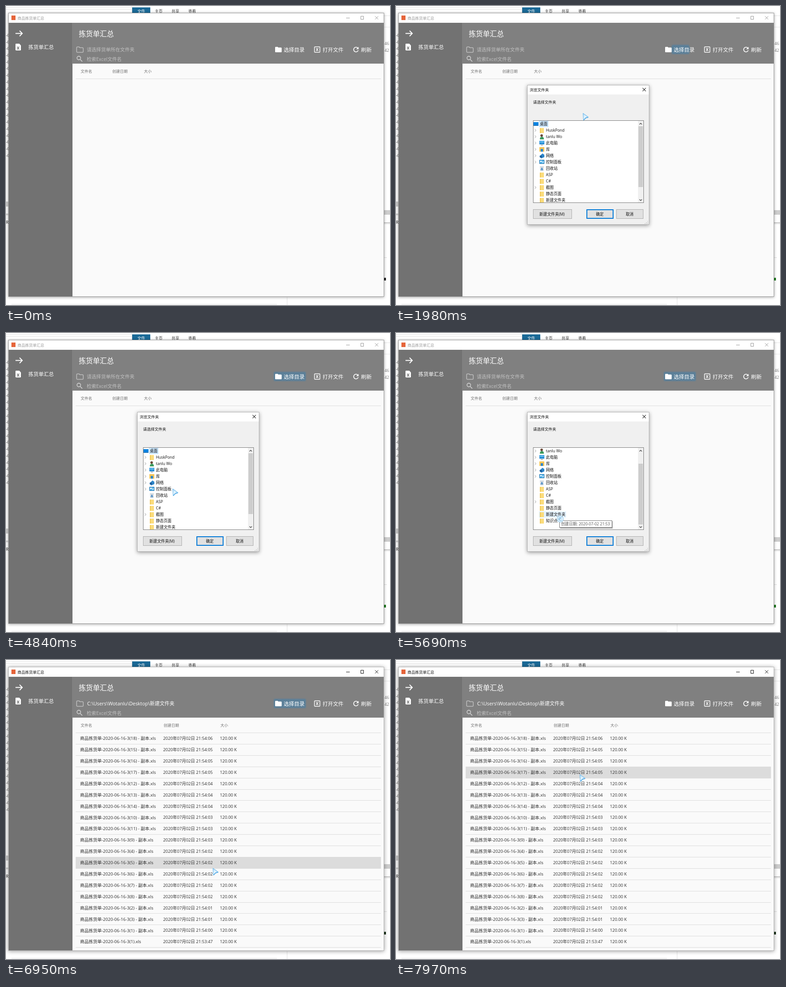
Recreate the animation shown at these times as an HTML page. Size 849 px wide and 659 px high, loop 8 s.

```html
<!DOCTYPE html>
<html lang="zh-CN">
<head>
<meta charset="utf-8">
<title>拣货单汇总</title>
<style>
html, body { margin: 0; width: 100%; height: 100%; overflow: hidden; background: #fff; }
svg { display: block; width: 849px; height: 659px; font-family: "Open Sans", "Noto Sans CJK SC", "Noto Sans CJK", sans-serif; }
text { white-space: pre; }
rect { shape-rendering: crispEdges; }
</style>
</head>
<body>
<svg id="stage" viewBox="0 0 849 659"></svg>
<script>
const LOOP = 8000, ROW = 24.9, TOP = 160;

// drawing helpers
const R = (x, y, w, h, fill, more = '') => `<rect x="${x}" y="${y}" width="${w}" height="${h}" fill="${fill}" ${more}/>`;
const T = (x, mid, size, str, fill, more = '') =>
  `<text x="${x}" y="${(mid + size * .37).toFixed(2)}" font-size="${size}" fill="${fill}" ${more}>${str}</text>`;
const L = (d, color, w = 1, more = '') => `<path d="${d}" fill="none" stroke="${color}" stroke-width="${w}" ${more}/>`;
const F = (d, fill) => `<path d="${d}" fill="${fill}"/>`;
const G = (id, body, more = '') => `<g id="${id}" ${more}>${body}</g>`;
const box = (x, y, w, h, fill, line) => R(x + .5, y + .5, w - 1, h - 1, fill, `stroke="${line}"`);
const range = (n, fn) => Array.from({ length: n }, (_, i) => fn(i)).join('');

// desktop behind the window
const desk = R(0, 0, 849, 659, '#fff') +
  R(0, 3, 278, 1, '#e2e2e2') + R(0, 7, 278, 1, '#e2e2e2') + R(278, 0, 1, 15, '#ddd') +
  R(279, 3, 40, 13, '#1b6a97') + T(290.5, 11.5, 8.6, '文件', '#fff') +
  ['主页', '共享', '查看'].map((s, i) => T(329 + 37 * i, 12, 8.6, s, '#333')).join('') +
  range(19, i => T(0, 64.5 + 14.72 * i, 9, '-0', '#333')) +
  R(0, 431, 6, 11, '#ccc') + R(0, 458, 6, 1, '#aaa') + R(0, 459, 6, 3, '#e6e6e6') +
  T(0, 477, 9, 'R', '#222') +
  R(836, 21, 13, 1, '#e4e4e4') + R(836, 46, 13, 1, '#e8e8e8') +
  T(837, 82.5, 8.6, '46', '#777') + T(837, 97.5, 8.6, '42', '#777') +
  R(836, 450, 13, 10, '#cdcdcd') + R(836, 477, 13, 1, '#aaa') + R(836, 478, 13, 3, '#e8e8e8') +
  R(836, 554, 6, 1, '#ddd') + R(836, 599, 4, 6, '#222', 'id="mark"') +
  R(12, 656, 587, 3, '#f5f5f5') + R(621, 642, 1, 17, '#e2e2e2');

// main window
const folder = (x, y) => `M${x} ${y + 1.5}q0-1.5 1.5-1.5h4l1.5 1.6h6q1.5 0 1.5 1.5v7.4q0 1.5-1.5 1.5h-11.5q-1.5 0-1.5-1.5z`;
const frame = R(5, 15, 831, 626, '#999', 'id="shade"') +
  R(6, 16, 829, 22, '#fff') + R(12, 21, 9, 10, '#e5643a') +
  T(25.5, 26.5, 8.45, '商品拣货单汇总', '#999', 'id="caption"') +
  G('controls', '<path d="M752 26.5h8M784.5 22.5h6v7h-6zM816 22.5l7 7m0-7l-7 7" fill="none"/>') +
  R(6, 37, 141, 603, '#727272') +
  R(147, 37, 688, 603, '#fafafa') + R(146, 37, 689, 90, '#808080') +
  L('M21 60.5h15M30 54.5l6 6-6 6', '#fff', 1.9) +
  F('M22.4 83h7l3.6 4v9.6q0 1.4-1.4 1.4h-9.2q-1.4 0-1.4-1.4v-12.2q0-1.4 1.4-1.4z', '#fff') +
  L('M24.5 89.5l4.6 6.5m0-6.5l-4.6 6.5', '#727272', 1.3) +
  T(49.5, 90.5, 11.25, '拣货单汇总', '#fff') +
  T(161, 61.5, 15.5, '拣货单汇总', '#fff') +
  L(folder(156.2, 90.2), '#c8c8c8', 1.3) +
  L('M165 114.6a4 4 0 1 1-8 0a4 4 0 1 1 8 0M164 117.8l4.6 4.6', '#d0d0d0', 1.6) +
  T(178.5, 96, 10.55, '请选择货单所在文件夹', '#c2c2c2', 'id="hint"') +
  T(179.5, 96, 10.85, 'C:\\Users\\Wotanlu\\Desktop\\新建文件夹', '#fff', 'id="path"') +
  T(178.5, 117, 10.5, '检索Excel文件名', '#c2c2c2') +
  '<g filter="url(#soften)"><g clip-path="url(#btn)"><circle id="ripple" cx="629" cy="96" r="0" fill="#5c8099"/></g></g>' +
  F(folder(595, 90), '#fff') + T(614, 96.5, 11.5, '选择目录', '#fff', 'font-weight="500"') +
  L('M683 90h10q1 0 1 1v10q0 1-1 1h-10q-1 0-1-1v-10q0-1 1-1zM685.7 92.8l4.6 6.4m0-6.4l-4.6 6.4', '#fff', 1.4) +
  T(700, 96.5, 11.5, '打开文件', '#fff', 'font-weight="500"') +
  L('M777.8 92.6a5.2 5.2 0 1 0 1 5', '#fff', 1.6) + F('M779.5 90v5.2h-5.2z', '#fff') +
  T(785, 96.5, 11.7, '刷新', '#fff', 'font-weight="500"') +
  T(165, 143.5, 8.5, '文件名', '#707070') +
  T(235, 143.5, 8.5, '创建日期', '#707070', 'id="colDate"') + T(305, 143.5, 8.5, '大小', '#707070', 'id="colSize"') +
  R(154, 160, 675, 1, '#dcdcdc');

// file table
const nums = [18, 15, 16, 17, 12, 13, 14, 10, 11, 9, 4, 5, 6, 7, 8, 2, 3, 1, 0];
const secs = '06 05 05 05 04 04 04 03 03 03 02 02 02 02 02 01 01 00 47'.split(' ');
const table = R(154, 0, 675, 25, '#dcdcdc', 'id="rowHover"') + nums.map((n, i) => {
  const mid = TOP + ROW * i + 12.7;
  const name = n ? `(${n}) - 副本` : '(1)';
  return T(163.7, mid, 9.57, `商品拣货单-2020-06-16-3${name}.xls`, '#2c2c2c') +
    T(347.5, mid, 9.3, `2020年07月02日 21:${n ? 54 : 53}:${secs[i]}`, '#2c2c2c') +
    T(473, mid, 9.3, '120.00 K', '#2c2c2c') +
    R(154, Math.round(TOP + ROW * (i + 1)), 675, 1, '#dcdcdc');
}).join('');

// folder picker
const yellow = y => R(318, y - 5.5, 9, 11, '#fbdc7c') + R(318, y - 5.5, 2, 11, '#f0c95c');
const screen = (x, y) => R(x, y - 5, 11, 8, '#2b8fd6') + R(x + 1, y - 4, 9, 3, '#63bdf0') + R(x + 3, y + 4, 5, 1, '#777');
const icons = {
  desk: y => R(304, y - 4, 11, 8, '#0a84e0') + R(304, y + 3, 11, 1, '#075a9c'),
  dir: yellow,
  user: y => F(`M318 ${y + 6}q0-6 4.5-6t4.5 6z`, '#3c9a5f') + `<circle cx="322" cy="${y - 2.5}" r="2.8" fill="#6b4a3a"/>`,
  pc: y => screen(317, y),
  lib: y => R(317, y - 5, 11, 10, '#f6c65a') + R(320, y - 1, 5, 6, '#2f86c9'),
  net: y => F(`M317 ${y + 1}l7-6 4 3v5l-7 3z`, '#2f86c9') + R(318, y, 5, 4, '#1d5f9c'),
  panel: y => box(317, y - 5, 11, 9, '#4fb2ea', '#2b77ad') + R(319, y - 3, 3, 3, '#fff') + R(324, y - 2, 2, 4, '#d7f0ff'),
  bin: y => F(`M318 ${y - 5}h9l-1 11h-7z`, '#d5dce2') + L(`M320.5 ${y + 3}l2-4 2 4z`, '#2676bd', 1.2)
};
const tree = [
  ['桌面', 'desk'], ['HuskPond', 'dir', 1], ['tanlu Wo', 'user', 1], ['此电脑', 'pc', 1], ['库', 'lib', 1],
  ['网络', 'net', 1], ['控制面板', 'panel', 1], ['回收站', 'bin'], ['ASP', 'dir'], ['C#', 'dir'],
  ['截图', 'dir', 1], ['静态页面', 'dir'], ['新建文件夹', 'dir'], ['知识点', 'dir']
];
const labelEnd = s => 333 + [...s].reduce((w, c) => w + (c > '\u00ff' ? 8.6 : 4.9), 0);
const button = (x, w, s, tx) => box(x, 448, w, 21, '#e1e1e1', '#adadad') + T(tx, 458.5, 8.6, s, '#111');
const treeRows = R(316, 253, 21, 14, '#cce8ff') + R(316, 0, 40, 14, '#e5f3ff', 'id="treeHover"') +
  tree.map(([s, icon, more], i) => {
    const y = 260 + 14 * i;
    return icons[icon](y) + T(i ? 331.5 : 318, y, 8.6, s, '#111') +
      (more ? L(`M306.5 ${y - 3}l3.2 3-3.2 3`, '#999', 1) : '');
  }).join('');
const picker = R(290, 174, 270, 308, '#aaa', 'filter="url(#dlgShade)"') +
  R(290.5, 174.5, 269, 307, '#f0f0f0', 'stroke="#b5b5b5"') + R(291, 175, 268, 20, '#fff') +
  T(295.5, 184.5, 8.5, '浏览文件夹', '#111') + L('M545.2 180.7l7.2 7.2m0-7.2l-7.2 7.2', '#222', 1.1) +
  T(303, 212, 8.5, '请选择文件夹', '#111') +
  box(303, 252, 245, 182, '#fff', '#7a7a7a') +
  `<g clip-path="url(#treeClip)">${G('treeRows', treeRows)}</g>` +
  R(535, 253, 12, 180, '#f0f0f0') + R(536, 265, 10, 134, '#cdcdcd', 'id="thumb"') +
  L('M538.3 261l2.7-2.7 2.7 2.7M538.3 426.2l2.7 2.7 2.7-2.7', '#444', 1.3) +
  button(303, 86, '新建文件夹(M)', 317) +
  button(487, 60, '取消', 508) +
  R(422, 449, 58, 19, '#e1e1e1', 'id="ok" stroke="#0078d7" stroke-width="2"') + T(442, 458.5, 8.6, '确定', '#111') +
  [[556, 474], [553, 477], [556, 477], [550, 479], [553, 479], [556, 479]].map(([x, y]) => R(x, y, 1, 1, '#999')).join('') +
  G('tip', R(2, 2, 0, 16, '#000', 'opacity=".35" class="tipBox"') + R(.5, .5, 0, 15, '#fff', 'stroke="#767676" class="tipBox"') + T(4, 8, 8.6, '', '#575757', 'id="tipText"'));

const pointer = G('cursor',
  G('arrow', '<path d="M.5 .5L12.2 9 6.3 10.6 1.6 15.6z" fill="url(#ice)" stroke="#78bdec" stroke-width="1.1" stroke-linejoin="round"/>' +
    L('M12 9.2L6.5 10.8 2 15.4', '#4aa5e3', 1.5)) +
  G('busy', '<circle cx="8" cy="8" r="6.7" fill="#f4fbff" stroke="#a9d3ee" stroke-width="1.8"/>' +
    L('M11 6.2a3.4 3.4 0 1 0 .2 3.2M5.8 9.2q2-3 4.4-1.6', '#6bb2e0', 1.3)));

const stage = document.getElementById('stage');
stage.innerHTML = `<defs>
  <filter id="soften" filterUnits="userSpaceOnUse" x="580" y="75" width="95" height="42"><feGaussianBlur stdDeviation="1"/></filter>
  <filter id="dlgShade" x="-10%" y="-10%" width="120%" height="120%"><feDropShadow dx="0" dy="2" stdDeviation="4.5" flood-opacity=".4"/></filter>
  <clipPath id="btn"><rect x="592" y="85.5" width="71" height="20.5" rx="2"/></clipPath>
  <clipPath id="treeClip"><rect x="304" y="253" width="231" height="180"/></clipPath>
  <linearGradient id="ice" x1="0" y1="0" x2="1" y2="1"><stop offset="0" stop-color="#a9d9f7"/><stop offset=".45" stop-color="#e6f5fe"/><stop offset="1" stop-color="#7cc4f2"/></linearGradient>
  </defs>` + desk + frame + G('table', table) + G('picker', picker) + pointer;

const $ = {};
stage.querySelectorAll('[id]').forEach(e => $[e.id] = e);
const set = (id, attrs) => { for (const k in attrs) $[id].setAttribute(k, attrs[k]); };
const show = (id, on) => { $[id].style.display = on ? '' : 'none'; };

// start, end, step count, way points
const moves = [
  [120, 890, 11, [[688, 523], [650, 400], [592, 250], [636, 126]]],
  [970, 1050, 2, [[625, 108], [629, 95]]],
  [1510, 1980, 7, [[611, 104], [500, 190], [413, 236]]],
  [2060, 2360, 5, [[398, 268], [340, 370]]],
  [2590, 3070, 7, [[344, 368], [357, 362], [357, 362], [338, 388]]],
  [3220, 3600, 6, [[333, 362], [358, 347]]],
  [3760, 4370, 9, [[356, 344], [352, 330], [339, 318]]],
  [4780, 4900, 3, [[355, 332], [368, 343], [366, 347]]],
  [5310, 5690, 6, [[366, 357], [355, 402]]],
  [6010, 6400, 6, [[372, 412], [457, 458.5]]],
  [7260, 7970, 10, [[452, 440], [428, 330], [405, 222], [406, 252]]]
];
const tips = [
  [2830, 2990, '包含您已经删除的文件和文件夹。'],
  [3600, 3760, '更改计算机设置并自定义其功能。'],
  [5690, 6010, '创建日期: 2020-07-02 21:53']
];

function along(pts, f) {
  const s = f * (pts.length - 1), i = Math.min(Math.floor(s), pts.length - 2), k = s - i;
  return pts[i].map((v, j) => v + (pts[i + 1][j] - v) * k);
}
function cursorAt(t) {
  let p = moves[0][3][0];
  for (const [a, b, n, pts] of moves) {
    if (t < a) break;
    const step = Math.min(n - 1, Math.floor((t - a) / (b - a) * (n - 1) + .001));
    p = along(pts, step / (n - 1));
  }
  return p;
}
const within = (t, a, b) => t >= a && t < b;
const ramp = (t, a, b) => Math.max(0, Math.min(1, (t - a) / (b - a)));

function draw(t) {
  const [x, y] = cursorAt(t);
  const active = within(t, 1200, 1430) || t >= 6560;
  const open = within(t, 1430, 6560), loaded = t >= 6870;
  const scroll = t >= 4900 ? 28 : 0;

  set('shade', { fill: active ? '#b4b4b4' : '#999' });
  $.shade.style.filter = active ? 'drop-shadow(0 1px 5px rgba(0,0,0,.4))' : 'drop-shadow(0 1px 3px rgba(0,0,0,.35))';
  set('caption', { fill: active ? '#111' : '#999' });
  set('controls', { stroke: active ? '#111' : '#999' });
  set('mark', { fill: t < 1200 ? '#222' : t < 6010 ? '#1d7a1d' : '#1b331b' });

  show('ripple', within(t, 1200, 7040));
  set('ripple', { r: 21 * ramp(t, 1120, 1430) + 22 * ramp(t, 1990, 2360) });

  show('hint', !loaded);
  show('path', loaded);
  show('table', loaded);
  set('colDate', { x: loaded ? 348.5 : 235 });
  set('colSize', { x: loaded ? 474 : 305 });
  set('rowHover', { y: Math.round(TOP + Math.floor((y - TOP) / ROW) * ROW) });

  show('picker', open);
  set('treeRows', { transform: `translate(0 ${-scroll})` });
  set('thumb', { y: scroll ? 288 : 265 });
  const i = Math.floor((y - 253 + scroll) / 14);
  const over = y >= 253 && y < 433 && i > 0 && tree[i] && x < labelEnd(tree[i][0]);
  show('treeHover', over || t >= 5840);
  const hot = t >= 5840 ? 12 : i;
  if (tree[hot]) set('treeHover', { y: 253 + 14 * hot, width: labelEnd(tree[hot][0]) - 316, fill: t >= 5840 ? '#cce8ff' : '#e5f3ff' });
  set('ok', { fill: x > 421 && x < 481 && y > 448 && y < 469 ? (t >= 6480 ? '#cce4f7' : '#e5f1fb') : '#e1e1e1' });

  const tip = tips.find(([a, b]) => within(t, a, b));
  show('tip', tip);
  if (tip) {
    $.tipText.textContent = tip[2];
    const w = Math.round($.tipText.getComputedTextLength() + 8);
    $.tip.querySelectorAll('.tipBox').forEach(e => e.setAttribute('width', w));
    set('tip', { transform: `translate(${Math.round(x + 5.5)} ${Math.round(y + 11)})` });
  }

  const busy = within(t, 2750, 4610) || within(t, 5540, 6010);
  show('cursor', t >= 120);
  show('arrow', !busy);
  show('busy', busy);
  set('cursor', { transform: `translate(${x} ${y})` });
}

const begin = performance.now();
function tick() {
  draw((performance.now() - begin) % LOOP);
  requestAnimationFrame(tick);
}
tick();
</script>
</body>
</html>
```
